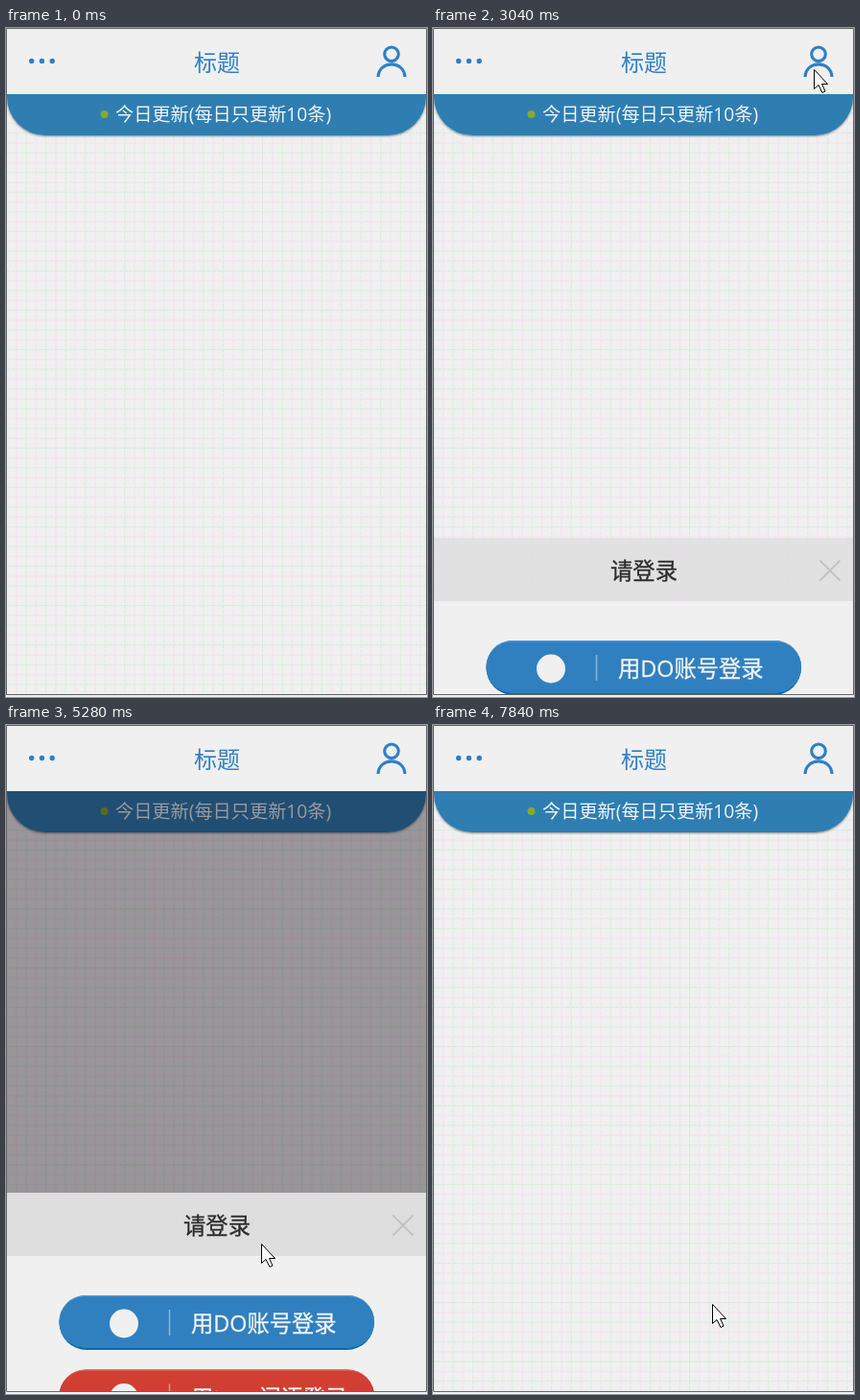
These frames come from a looping animation (439x698 px, 8000 ms). An HTML page:

```html
<!DOCTYPE html>
<html lang="zh">
<head>
<meta charset="utf-8">
<title>登录面板</title>
<style>
html, body { margin: 0; width: 100%; height: 100%; overflow: hidden; background: #eef1f4; }
svg { display: block; width: 439px; height: 698px; }
text { font-family: "Open Sans", "Noto Sans CJK SC", "Noto Sans CJK", sans-serif; }
.label { font-size: 23.3px; fill: #f4f4f4; stroke: #f4f4f4; stroke-width: .3; }
.heading { font-size: 23.3px; fill: #2d2d2d; stroke: #2d2d2d; stroke-width: .3; text-anchor: middle; }
.line { fill: none; stroke: #2f80c4; stroke-width: 3.1; }
</style>
</head>
<body>
<svg viewBox="0 0 439 698">
  <defs>
    <pattern id="grid" width="20.54" height="20.54" y="6.4" patternUnits="userSpaceOnUse">
      <path d="M0 .5H20.54M.5 0V20.54" stroke="#d6edd8" stroke-dasharray="4 1"/>
      <path d="M0 10.77H20.54M10.77 0V20.54" stroke="#f3dcef" stroke-dasharray="4 1"/>
    </pattern>
    <filter id="soft" x="-5%" y="-20%" width="110%" height="150%">
      <feDropShadow dx="0" dy="1" stdDeviation="1.2" flood-opacity=".45"/>
    </filter>
    <clipPath id="view"><path d="M1 69H438V695H1Z"/></clipPath>
  </defs>

  <path fill="#f0f0f0" d="M0 0H439V696H0Z"/>
  <g clip-path="url(#view)">
    <path fill="url(#grid)" d="M1 69H438V695H1Z"/>
    <path fill="#2f7eb2" filter="url(#soft)" d="M1 60H438V72A40 40 0 0 1 398 112H41A40 40 0 0 1 1 72Z"/>
    <circle cx="102.5" cy="90" r="4" fill="#87a932"/>
    <text x="114" y="97" font-size="19.2" fill="#f2f5f8">今日更新(每日只更新10条)</text>
    <path id="dim" fill="#0c000c" fill-opacity=".38" d="M1 69H438V695H1Z"/>

    <g id="panel">
      <path fill="#e2e1e2" fill-opacity=".97" d="M1 0H438V66H1Z"/>
      <path fill="#f0f0f0" d="M1 66H438V640H1Z"/>
      <text class="heading" x="220" y="43">请登录</text>
      <path d="M403.5 23.5L424.5 44.5M424.5 23.5L403.5 44.5" stroke="#c3c3c3" stroke-width="2"/>
      <g id="buttons"></g>
    </g>
  </g>

  <g id="dots" fill="#2f80c4"></g>
  <text x="220" y="44.5" text-anchor="middle" font-size="24" fill="#2f80c4">标题</text>
  <circle class="line" cx="402" cy="27.3" r="7.3"/>
  <path class="line" d="M388 51C389 33.5 415 33.5 416 51"/>
  <path d="M.5 695.5V.5H438.5V695.5Z" fill="none" stroke="#62666a"/>
  <path id="cursor" fill="#fff" stroke="#000" d="M.5 .5V20.5L5 16.5L9 24.5L12 23L8.5 15.5H14.5Z"/>
</svg>
<script>
const $ = id => document.getElementById(id);
const LOOP = 8000, STEP = 160;
const OPEN = 413, PEEK = 642, CLOSED = 700, GRIP = 466;

const button = (y, color, edge, shine, label) => `
  <g transform="translate(0 ${y})">
    <rect x="55.5" width="328.5" height="57" rx="28.5" fill="${edge}"/>
    <rect x="55.5" width="328.5" height="54.5" rx="27.2" fill="${shine}"/>
    <rect x="55.5" y="1.2" width="328.5" height="53.3" rx="26.6" fill="${color}"/>
    <circle cx="123" cy="29.5" r="15" fill="#f0f0f0"/>
    <path d="M170.5 15V42" stroke="#fff" stroke-opacity=".42" stroke-width="1.5"/>
    <text class="label" x="193" y="38">${label}</text>
  </g>`;
$('buttons').innerHTML =
  button(107, '#3080c0', '#096aa6', '#5c9fd2', '用DO账号登录') +
  button(184.5, '#d03f31', '#b32b1c', '#dc6a5e', '用tavo闲语登录');
$('dots').innerHTML = [0, 1, 2].map(i =>
  `<circle cx="${26.7 + i * 10.75}" cy="34.5" r="2.7"/>`).join('');

const mix = (a, b, p) => a + (b - a) * p;
const progress = (t, start, length) => Math.min(1, Math.max(0, (t - start) / length));
const smooth = p => p * p * (3 - 2 * p);

// Pointer moves: start, end and destination
const moves = [
  [320, 640, 397, 43],
  [3840, 4480, 273, 445],
  [4480, 5600, 264, 565],
  [5600, 6400, 281, 449],
  [6400, 7200, 280, 627],
  [7680, 7840, 291, 604]
];

function pointer(t) {
  let x = 404, y = 170;
  for (const [start, end, toX, toY] of moves) {
    const p = smooth(progress(t, start, end - start));
    x = mix(x, toX, p);
    y = mix(y, toY, p);
  }
  return [x, y];
}

const rise = (t, start) => mix(PEEK, OPEN, 1 - (1 - progress(t, start, 480)) ** 5);
const drag = y => OPEN + Math.max(0, y - GRIP);

function panelTop(t, y) {
  if (t < 800) return CLOSED;
  if (t < 1600) return rise(t, 960);
  if (t < 3520) return mix(448, CLOSED, progress(t, 2880, 480));
  if (t < 4480) return rise(t, 3840);
  return mix(drag(y), CLOSED, progress(t, 7200, 320));
}

const dimmed = t => t >= 800 && t < 1600 || t >= 3520 && t < 7360;

function draw(now) {
  const t = Math.floor(now % LOOP / STEP) * STEP;
  const [x, y] = pointer(t).map(Math.round);
  $('cursor').setAttribute('transform', `translate(${x} ${y})`);
  $('cursor').style.display = t < 320 ? 'none' : '';
  $('panel').setAttribute('transform', `translate(0 ${Math.round(panelTop(t, y))})`);
  $('dim').style.display = dimmed(t) ? '' : 'none';
}

const start = performance.now();
function tick() {
  draw(performance.now() - start);
  requestAnimationFrame(tick);
}
tick();
</script>
</body>
</html>
```
